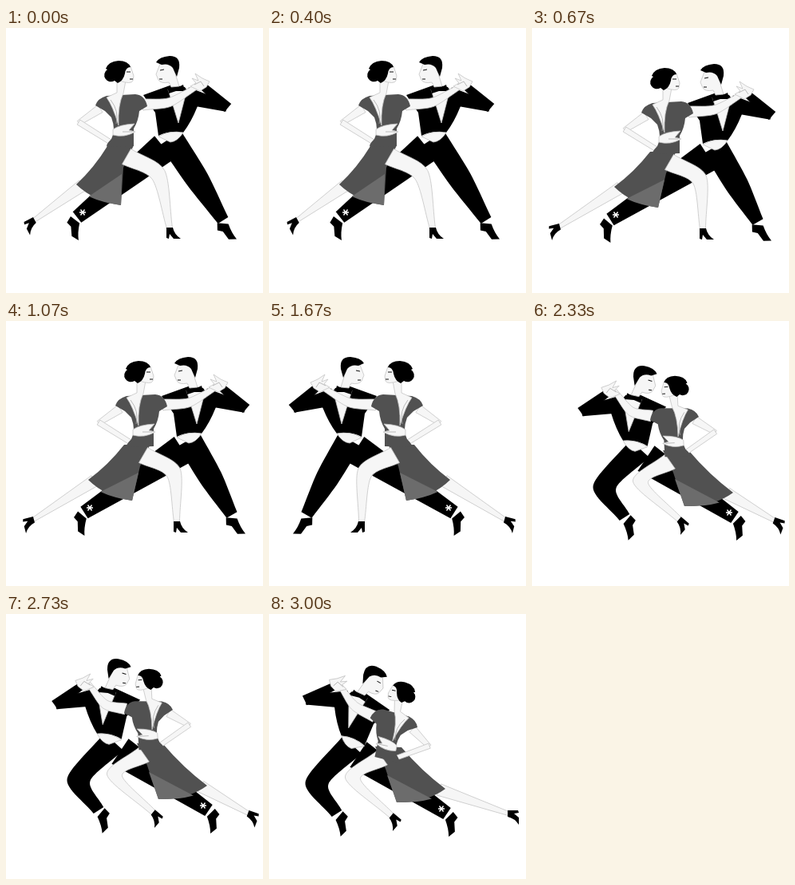
An HTML page for the animation above (3660 ms loop, 322x332 px).

```html
<!DOCTYPE html>
<html lang="en">
<head>
<meta charset="utf-8">
<title>Tango</title>
<style>
html, body { margin: 0; height: 100%; overflow: hidden; background: #fff; }
svg { display: block; width: 322px; height: 332px; }
.skin { fill: #f6f6f6; stroke: #c4c4c4; stroke-width: .8; }
.dress { fill: #515151; }
.sheer { fill: #6c6c6c; }
.line { fill: none; stroke: #111; }
.crease { fill: none; stroke: #aaa; stroke-width: .8; }
.star { stroke: #fff; stroke-width: 1.4; }
</style>
</head>
<body>
<svg id="stage" viewBox="0 0 322 332"></svg>
<script>
const path = (kind, d) => `<path class="${kind}" d="${d}"/>`;
const group = (transform, ...parts) => `<g transform="${transform}">${parts.join('')}</g>`;
const add = ([x, y], [dx, dy], k = 1) => [x + dx * k, y + dy * k];
const sub = (a, b) => add(a, b, -1);
const mix = (a, b, k) => add(a, sub(b, a), k);

// One edge of a limb: straight, or softly bent at its middle joint
function edge([a, b, c]) {
  if (!c) return `${a}L${b}`;
  const bend = sub(c, a);
  return `${a}C${mix(a, b, 1 / 3)} ${add(b, bend, -1 / 8)} ${b}C${add(b, bend, 1 / 8)} ${mix(c, b, 1 / 3)} ${c}`;
}

// Tapered limb through two or three joints, with a width at each
function limb(kind, joints, widths) {
  const unit = ([x, y]) => [x / Math.hypot(x, y), y / Math.hypot(x, y)];
  const side = sign => joints.map((joint, i) => {
    const before = i ? unit(sub(joint, joints[i - 1])) : [0, 0];
    const after = joints[i + 1] ? unit(sub(joints[i + 1], joint)) : [0, 0];
    const [x, y] = unit(add(before, after));
    return add(joint, [y, -x], sign * widths[i] / 2);
  });
  return path(kind, `M${edge(side(1))}L${edge(side(-1).reverse())}Z`);
}

const manHead = path('skin', 'M193 45L188 58 191 65Q194 70 204 68L207 74 217 73 208 44Z')
  + path('black', 'M188 43Q192 36 205 35Q219 35 217 50L214 61 209 50Q204 44 195 46Z')
  + path('line', 'M193 53l5 -1M192 64l4 0');

const manBody = path('black', 'M172 84L208 71 224 74 240 98Q232 118 222 131Q205 128 191 135L187 106Z')
  + limb('black', [[226, 85], [277, 99]], [22, 12])
  + limb('black', [[278, 100], [248, 74]], [13, 10])
  + path('skin', 'M203 77L222 76 225 84 216 119Z')
  + path('black', 'M202 73L212 76 222 71 224 79 213 79 204 82Z')
  + path('skin', 'M191 136Q205 128 222 131Q215 142 206 143Z');

const clasp = path('skin', 'M231 73L238 69 233 63 241 66 237 57 246 63 255 67 251 74 243 79Z')
  + path('crease', 'M236 71l8 -4 4 6');

const womanUpper = limb('skin', [[118, 101], [91, 119]], [11, 6])
  + limb('skin', [[91, 118], [131, 143]], [7, 6])
  + path('dress', 'M112 97Q115 88 126 85L162 83Q174 84 177 98L167 104Q166 116 160 126L160 148 127 149Q124 147 132 139Q138 128 132 112L124 104Z')
  + path('skin', 'M126 87L139 81 139 66 150 66 147 82Q140 96 141 122Q134 98 126 87Z')
  + path('skin', 'M134 127Q142 121 161 120L154 128 162 130Q148 138 134 134Z')
  + path('crease', 'M131 90Q142 104 138 120M146 130l12 0')
  + path('skin', 'M148 46L156 48 160 60 159 66Q157 71 142 66Z')
  + path('black', 'M125 51Q128 42 141 41Q153 41 156 49Q150 49 149 57Q147 66 140 69L136 66A8 8 0 1 1 127 52Z')
  + path('line', 'M151 55l5 0M155 64l4 0');

const pump = 'M-4 -1L4 -1Q6 8 14 13L5 13 0 7-1 13-4 12Z';
const brogue = 'M-7 4L7 4Q12 15 19 22L9 23 1 14-6 13Z';
const shoe = (shape, [x, y], turn) => group(`translate(${x} ${y})rotate(${turn})`, path('black', shape));

// Joints are ankles, knees and hips; hem runs from the back leg to the slit.
// Turns: her back foot, her front foot, his back foot, his front foot.
const standing = {
  waist: [206, 138], manKnee: [240, 190], manFront: [272, 241], manBack: [89, 237],
  hip: [151, 161], knee: [191, 184], front: [205, 251], back: [35, 241],
  hem: [[88, 196], [144, 222]], arm: [[171, 96], [205, 93], [240, 73]],
  turns: [62, 0, 37, 5],
  man: '', manTilt: 0, woman: '', legs: '',
};

const stretched = {
  waist: [229, 149], manKnee: [257, 197], manFront: [283, 243], manBack: [98, 240],
  hip: [172, 168], knee: [210, 190], front: [214, 252], back: [34, 249],
  hem: [[103, 199], [158, 225]], arm: [[196, 105], [230, 102], [265, 82]],
  turns: [75, 0, 40, 5],
  man: 'translate(23 10)', manTilt: 0, woman: 'translate(25 9)', legs: '',
};

const dip = {
  waist: [216, 152], manKnee: [260, 200], manFront: [235, 238], manBack: [97, 238],
  hip: [178, 168], knee: [215, 194], front: [166, 241], back: [20, 238],
  hem: [[99, 207], [160, 224]], arm: [[187, 117], [213, 103], [231, 78]],
  turns: [90, 50, 45, 50],
  man: 'translate(-7 14)rotate(-15 213 75)', manTilt: -4,
  woman: 'translate(134 130)rotate(-12)scale(.93)translate(-112 -97)', legs: '',
};

const lunge = {
  ...dip,
  back: [47, 242], arm: [[180, 119], [206, 113], [227, 87]],
  turns: [70, 50, 45, 50],
  man: 'translate(-11 20)rotate(-5 213 75)', manTilt: -2,
  woman: 'translate(121 120)rotate(3)scale(.94)translate(-112 -97)', legs: 'translate(-21 8)',
};

function skirt({ hip, hem: [rear, low] }) {
  const curve = add(mix(rear, low, .4), [0, 11]);
  const left = add(hip, [-24, -13]), right = add(hip, [9, -14]), slit = add(hip, [-4, 14]);
  return path('dress', `M${left}Q${add(mix(left, rear, .5), [3, 3])} ${rear}Q${curve} ${low}L${slit} ${right}Z`)
    + path('sheer', `M${add(slit, [-2, 8])}L${mix(rear, curve, .7)}Q${mix(curve, low, .3)} ${low}Z`);
}

function draw(p) {
  const [backTurn, frontTurn, manBackTurn, manFrontTurn] = p.turns;
  return group(p.legs,
      limb('black', [add(p.waist, [-8, 12]), p.manBack], [38, 17]),
      limb('black', [p.waist, p.manKnee, p.manFront], [32, 29, 15]),
      shoe(brogue, p.manBack, manBackTurn), shoe(brogue, p.manFront, manFrontTurn))
    + group(p.man, manBody, group(`rotate(${p.manTilt} 213 72)`, manHead))
    + group(p.legs,
      limb('skin', [add(p.hem[0], [8, 1]), p.back], [15, 5]),
      skirt(p),
      limb('skin', [p.hip, p.knee, p.front], [22, 19, 7]),
      shoe(pump, p.back, backTurn), shoe(pump, p.front, frontTurn),
      path('star', `M${add(p.manBack, [7, -6])}m-4 0h8m-6.5 -3.5l5 7m0 -7l-5 7`))
    + limb('skin', p.arm, [14, 11, 6])
    + group(p.woman, womanUpper)
    + group(p.man, clasp);
}

const flip = (x, y) => `translate(${x} ${y})scale(-1 1)`;

// [end time in ms, pose, placement]
const steps = [
  [670, standing, ''],
  [1330, stretched, ''],
  [1670, dip, ''],
  [2330, stretched, flip(330, 0)],
  [3000, lunge, flip(330, 0)],
  [3660, dip, flip(320, 12)],
];

const stage = document.getElementById('stage');
const start = performance.now();
let shown;

function tick() {
  const time = (performance.now() - start) % 3660;
  const step = steps.find(([end]) => time < end);
  if (step !== shown) {
    stage.innerHTML = group(step[2], draw(step[1]));
    shown = step;
  }
  requestAnimationFrame(tick);
}
tick();
</script>
</body>
</html>
```
